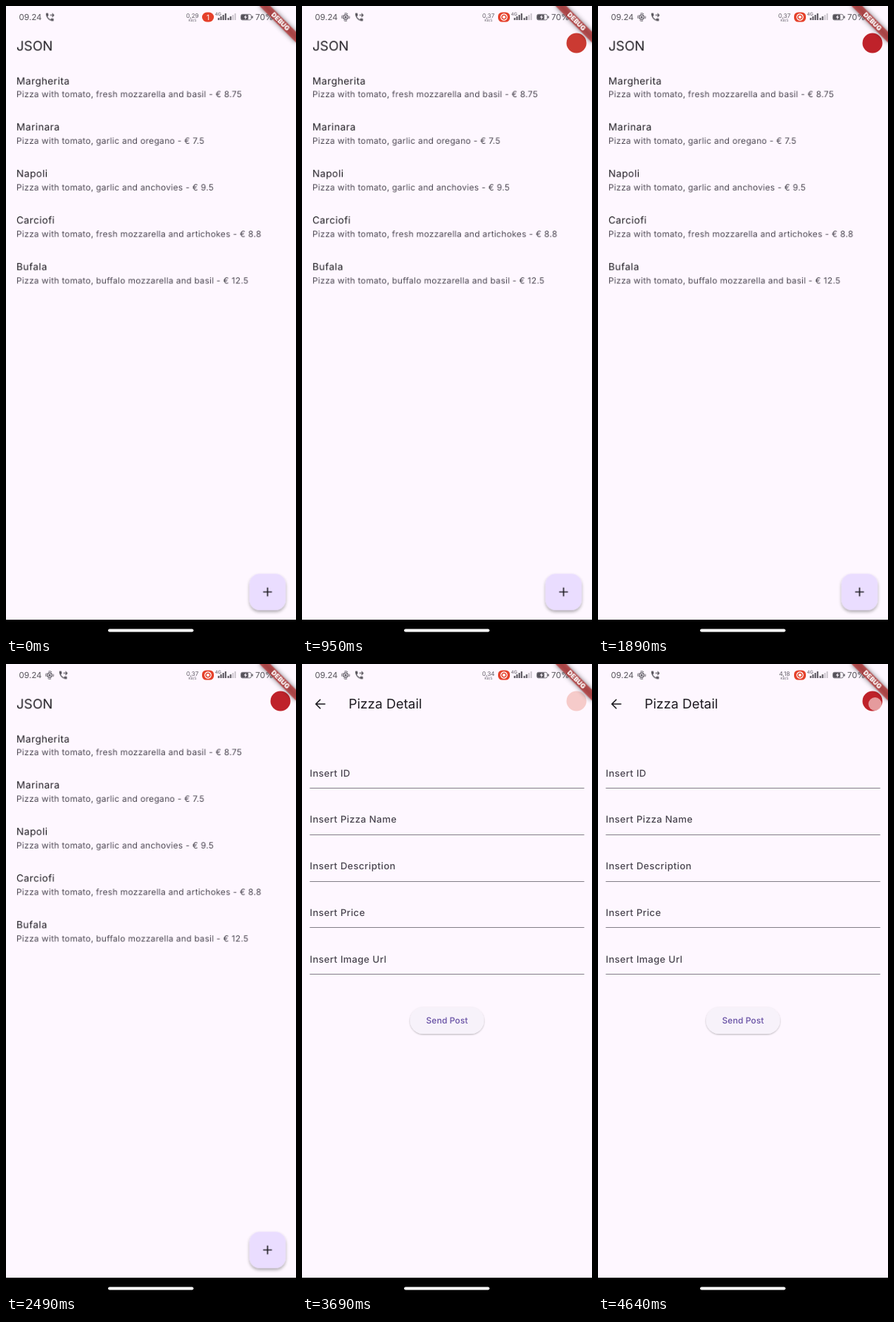
Recreate the animation shown at these times as an HTML page. Size 392x850 px, loop 4660 ms.

```html
<!DOCTYPE html>
<html lang="en">
<head>
<meta charset="utf-8">
<title>Pizza list</title>
<style>
  html, body { margin: 0; width: 100%; height: 100%; overflow: hidden; background: #fef7ff; }
  svg { display: block; width: 392px; height: 850px; font-family: Inter, Roboto, sans-serif; text-rendering: geometricPrecision; }
  .heading { font-size: 18px; fill: #1d1b20; }
  .name { font-size: 13.2px; letter-spacing: .45px; fill: #1d1b20; }
  .info { font-size: 11.5px; letter-spacing: .265px; fill: #49454f; }
  .label { font-size: 12.8px; font-weight: 500; letter-spacing: .41px; fill: #49454f; }
  .send { font-size: 11.5px; font-weight: 500; letter-spacing: .08px; fill: #6750a4; }
  .status { font-size: 11.2px; fill: #56535a; }
  .rate { font-size: 8px; fill: #5f5c64; }
  .line { fill: none; stroke: #1d1b20; stroke-width: 1.6; }
  #list, #detail { transform-origin: 196px 414px; }
  #dot { transform-origin: 371px 50px; }
</style>
</head>
<body>
<svg viewBox="0 0 392 850">
  <defs>
    <filter id="soft" x="-30%" y="-30%" width="160%" height="170%">
      <feDropShadow dx="0" dy="2.5" stdDeviation="2.2" flood-color="#000" flood-opacity=".32"/>
    </filter>
    <filter id="low" x="-10%" y="-20%" width="120%" height="150%">
      <feDropShadow dx="0" dy="1" stdDeviation=".8" flood-color="#000" flood-opacity=".28"/>
    </filter>
    <filter id="blur" x="-30%" y="-200%" width="160%" height="500%">
      <feGaussianBlur stdDeviation="3.4"/>
    </filter>
    <g id="rec">
      <circle r="4.2" fill="none" stroke="currentColor" stroke-width="1.2"/>
      <circle r="2.1" fill="currentColor"/>
    </g>
  </defs>
  <rect width="392" height="850" fill="#fef7ff"/>

  <g id="list">
    <text class="heading" x="14" y="60.3">JSON</text>
    <g id="rows"></g>
    <g filter="url(#soft)"><rect id="fab" x="329" y="766" width="49" height="49" rx="14" fill="#eaddff"/></g>
    <circle id="touch" cx="351.5" cy="795" r="8.5" fill="#9d96a8" opacity="0"/>
    <path class="line" d="M347.5 790.500h12M353.500 784.500v12"/>
  </g>

  <g id="detail" opacity="0">
    <rect width="392" height="850" fill="#fef7ff"/>
    <path class="line" d="M31.500 54H19M25 47.800L18.800 54L25 60.200"/>
    <text class="heading" x="63" y="60.3">Pizza Detail</text>
    <g id="fields"></g>
    <rect x="146" y="463" width="100" height="36" rx="18" fill="#f7f2fa" filter="url(#low)"/>
    <text class="send" x="196" y="485.2" text-anchor="middle">Send Post</text>
  </g>

  <g id="bar">
    <text class="status" x="17.5" y="19">09.24</text>
    <g id="capture" transform="translate(59 15)" color="#5f5c64" opacity="0">
      <circle r="3.2" fill="none" stroke="currentColor" stroke-width="1.2"/>
      <circle r="1.6" fill="currentColor"/>
      <circle r="5.2" fill="none" stroke="currentColor" stroke-dasharray="4.6 3.57" stroke-dashoffset="2.3"/>
    </g>
    <g id="phone">
      <g transform="translate(52.2 8) scale(.58)">
        <path fill="#56535a" d="M6.6 10.800C8 13.600 10.400 15.900 13.200 17.400L15.400 15.200Q15.900 14.800 16.400 14.900Q18.200 15.500 20 15.500Q21 15.600 21 16.500V20Q21 21 20 21C10.600 21 3 13.400 3 4Q3 3 4 3H7.500Q8.500 3 8.500 4Q8.500 5.800 9.100 7.600Q9.200 8.200 8.800 8.600Z"/>
        <path d="M12.500 7.500H21M17.500 3.500L21.500 7.500L17.500 11.500" fill="none" stroke="#56535a" stroke-width="2"/>
      </g>
    </g>
    <g id="rates"></g>
    <text x="252" y="20.8" font-size="4.8" fill="#6b6870" text-anchor="middle">KB/S</text>
    <g id="count">
      <rect x="265" y="8.500" width="16" height="13" rx="6.500" fill="#e5402a"/>
      <text x="273" y="18.700" font-size="10" fill="#fff" text-anchor="middle">1</text>
    </g>
    <g id="badge" opacity="0">
      <rect x="265" y="8.500" width="16" height="13" rx="5.500" fill="#e5402a"/>
      <use href="#rec" x="273" y="15" color="#fff"/>
    </g>
    <text x="282.5" y="12.5" font-size="6" fill="#56535a">4G</text>
    <g id="signal" fill="#56535a"></g>
    <g fill="#56535a">
      <rect x="317.500" y="11.300" width="14" height="7.500" rx="2" fill="none" stroke="#77747c"/>
      <rect x="318" y="11.500" width="9.500" height="7" rx="1.500"/>
      <rect x="332.300" y="13.500" width="1.500" height="3"/>
      <path d="M324.500 11.800L321.500 15.500H323.500L322.800 18.500L326 14.600H324Z" fill="#fef7ff"/>
    </g>
    <text class="status" x="337" y="19">70%</text>
  </g>

  <g id="dot">
    <circle id="disc" cx="371" cy="50" r="13.5" fill="#cb3a32"/>
    <circle id="tap" cx="374.5" cy="54" r="9" fill="#f2c4c4" opacity="0"/>
  </g>
  <g transform="translate(371 21) rotate(45)">
    <rect x="-35" y="-5.25" width="70" height="10.5" opacity=".5" filter="url(#blur)"/>
    <rect x="-35" y="-5.25" width="70" height="10.5" fill="#b71c1c" fill-opacity=".63"/>
    <text y="3.2" font-size="8.9" font-weight="900" fill="#fff" text-anchor="middle">DEBUG</text>
  </g>
  <rect y="828" width="392" height="22"/>
  <rect x="138" y="840.5" width="115.5" height="4" rx="2" fill="#fff"/>
</svg>
<script>
  const LOOP = 4660;
  const PITCH = 62.75;
  const $ = id => document.getElementById(id);

  function add(parent, tag, attrs, text = '') {
    const el = document.createElementNS('http://www.w3.org/2000/svg', tag);
    for (const key in attrs) el.setAttribute(key, attrs[key]);
    el.textContent = text;
    return $(parent).appendChild(el);
  }

  const pizzas = [
    ['Margherita', 'Pizza with tomato, fresh mozzarella and basil - € 8.75'],
    ['Marinara', 'Pizza with tomato, garlic and oregano - € 7.5'],
    ['Napoli', 'Pizza with tomato, garlic and anchovies - € 9.5'],
    ['Carciofi', 'Pizza with tomato, fresh mozzarella and artichokes - € 8.8'],
    ['Bufala', 'Pizza with tomato, buffalo mozzarella and basil - € 12.5']
  ];
  pizzas.forEach(([name, info], i) => {
    add('rows', 'text', { class: 'name', x: 14, y: 105.5 + i * PITCH }, name);
    add('rows', 'text', { class: 'info', x: 14, y: 123 + i * PITCH }, info);
  });

  ['ID', 'Pizza Name', 'Description', 'Price', 'Image Url'].forEach((field, i) => {
    add('fields', 'text', { class: 'label', x: 10.5, y: 151.6 + i * PITCH }, 'Insert ' + field);
    add('fields', 'rect', { x: 10.5, y: Math.round(167 + i * PITCH), width: 371, height: 1, fill: '#85818a' });
  });

  for (let i = 0; i < 8; i++) {
    const level = i % 4, h = 3 + level * 2;
    add('signal', 'rect', {
      x: 286.5 + level * 3.1 + (i > 3 ? 13 : 0), y: 19 - h, width: 2, height: h,
      opacity: i > 5 ? .3 : 1
    });
  }

  // steps: [ms, value, easing?]; the ends of the loop hold the outer values
  function play(el, prop, steps) {
    const all = [...steps, [LOOP, steps[steps.length - 1][1]]];
    if (steps[0][0] > 0) all.unshift([0, steps[0][1]]);
    el.animate(
      all.map(([ms, value, easing = 'linear']) => ({ offset: ms / LOOP, [prop]: value, easing })),
      { duration: LOOP, iterations: Infinity }
    );
  }
  const fade = (el, from, to, a = 0, b = 1) => play(el, 'opacity', [[from, a], [to, b]]);

  const rates = [['0,29', 0], ['0,37', 590], ['0,34', 2640], ['4,18', 3740]];
  rates.forEach(([text, start], i) => {
    const el = add('rates', 'text', { class: 'rate', x: 252, y: 15.5, 'text-anchor': 'middle' }, text);
    const steps = [[start, 1]];
    if (i > 0) steps.unshift([start, 0]);
    if (i < rates.length - 1) steps.push([rates[i + 1][1], 1], [rates[i + 1][1], 0]);
    play(el, 'opacity', steps);
  });

  // recording starts
  fade($('count'), 60, 170, 1, 0);
  play($('badge'), 'opacity', [[90, 0], [200, .28], [330, 1]]);
  fade($('capture'), 480, 560);
  play($('phone'), 'transform', [[420, 'translate(0px)', 'ease-out'], [540, 'translate(18px)']]);

  // floating record button
  fade($('dot'), 170, 450);
  play($('disc'), 'fill', [
    [950, '#cb3a32'], [1890, '#bf222a'], [2560, '#bf222a'], [3030, '#d24346'],
    [3400, '#f6cbca'], [4400, '#f6cbca'], [4520, '#bf222a']
  ]);
  fade($('tap'), 4480, 4580, 0, .75);

  // press and page change
  play($('fab'), 'fill', [[2960, '#eaddff'], [3030, '#dcd2ea']]);
  fade($('touch'), 2960, 3020, 0, .5);
  const settle = 'cubic-bezier(.1,.7,.2,1)';
  play($('list'), 'transform', [[3050, 'scale(1)', settle], [3320, 'scale(1.05)']]);
  play($('detail'), 'transform', [[3050, 'scale(.85)', settle], [3320, 'scale(1)']]);
  fade($('detail'), 3075, 3140);
  play($('list'), 'opacity', [[3150, 1], [3150, 0]]);
</script>
</body>
</html>
```
